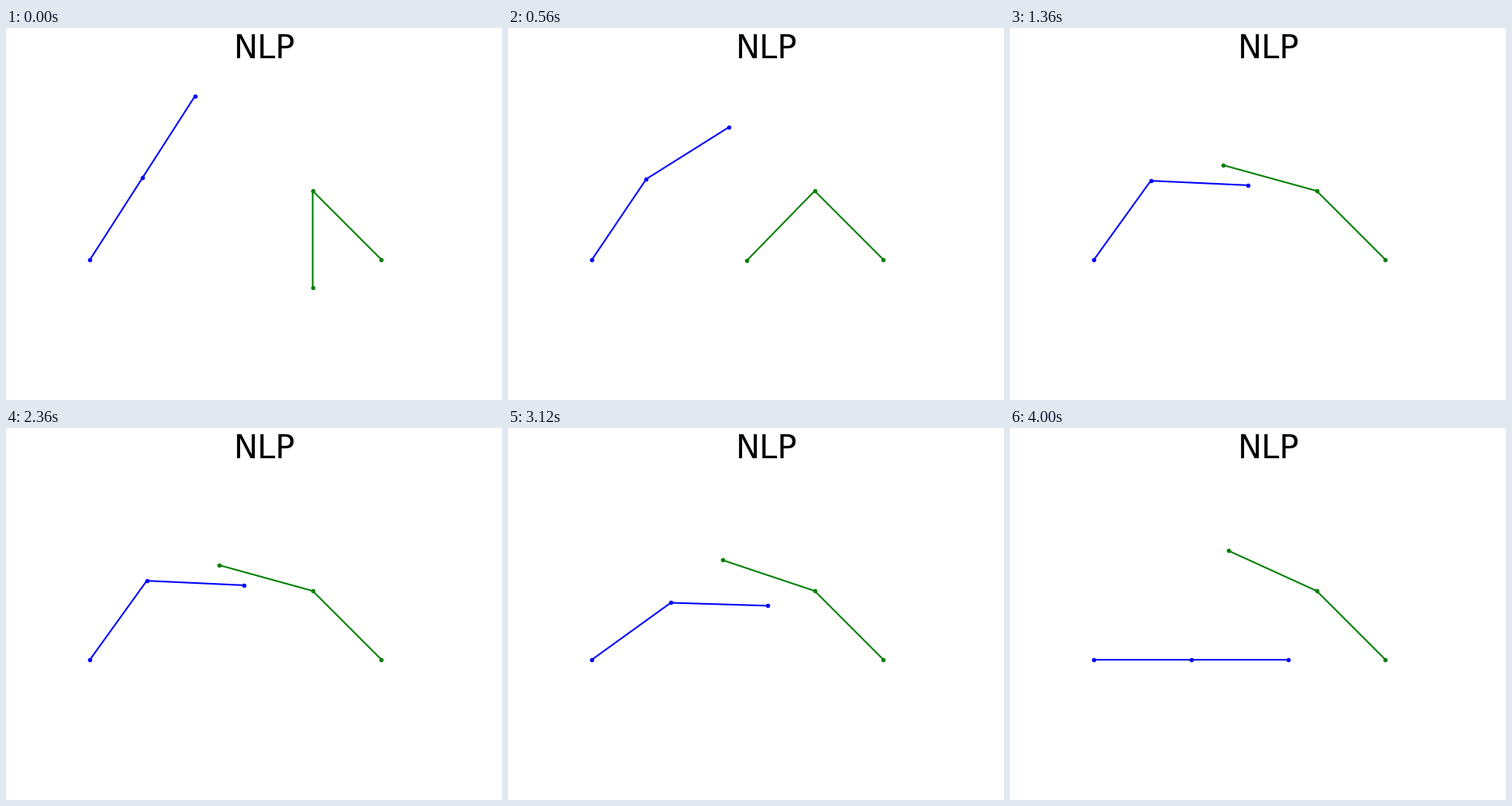
These frames come from a looping animation (640 by 480 pixels, 4.04 s). A matplotlib script:

```python
import numpy as np
import matplotlib.pyplot as plt
from matplotlib.animation import FuncAnimation

W, H, DPI = 640, 480, 100
FRAMES, INTERVAL = 101, 40
LINK = 125.3
BASE_Y = 298.8
BLUE_X = 108.4
GREEN_X = BLUE_X + 3 * LINK

# Joint angles in degrees at the ends of the three equal phases
KNOTS = [0, 1, 2, 3]
BLUE_SHOULDER = [np.degrees(1), 54.25, 54.25, 0]
BLUE_ELBOW = [0, -56.9, -56.9, 0]
GREEN_SHOULDER = [135, 135, 135, 135]
GREEN_ELBOW = [135, 29.6, 29.6, 20.5]

fig = plt.figure(figsize=(W / DPI, H / DPI), dpi=DPI, facecolor="white")
ax = fig.add_axes([0, 0, 1, 1])
ax.set_xlim(0, W)
ax.set_ylim(H, 0)
ax.axis("off")
ax.text(293.4, 39.3, "NLP", fontsize=30, family="DejaVu Sans",
        ha="left", va="baseline", color="black")

blue, = ax.plot([], [], ".-", color="blue", lw=1.5, ms=6)
green, = ax.plot([], [], ".-", color="green", lw=1.5, ms=6)


def arm(base_x, shoulder, elbow):
    """Points of a two-link arm; the elbow angle is relative."""
    angles = np.radians([shoulder, shoulder + elbow])
    xs = base_x + LINK * np.append(0, np.cumsum(np.cos(angles)))
    ys = BASE_Y - LINK * np.append(0, np.cumsum(np.sin(angles)))
    return xs, ys


def update(i):
    t = 3 * i / (FRAMES - 1)
    blue.set_data(*arm(BLUE_X, np.interp(t, KNOTS, BLUE_SHOULDER),
                       np.interp(t, KNOTS, BLUE_ELBOW)))
    green.set_data(*arm(GREEN_X, np.interp(t, KNOTS, GREEN_SHOULDER),
                        np.interp(t, KNOTS, GREEN_ELBOW)))
    return blue, green


anim = FuncAnimation(fig, update, frames=FRAMES, interval=INTERVAL,
                     repeat=True, repeat_delay=0)
plt.show()
```
